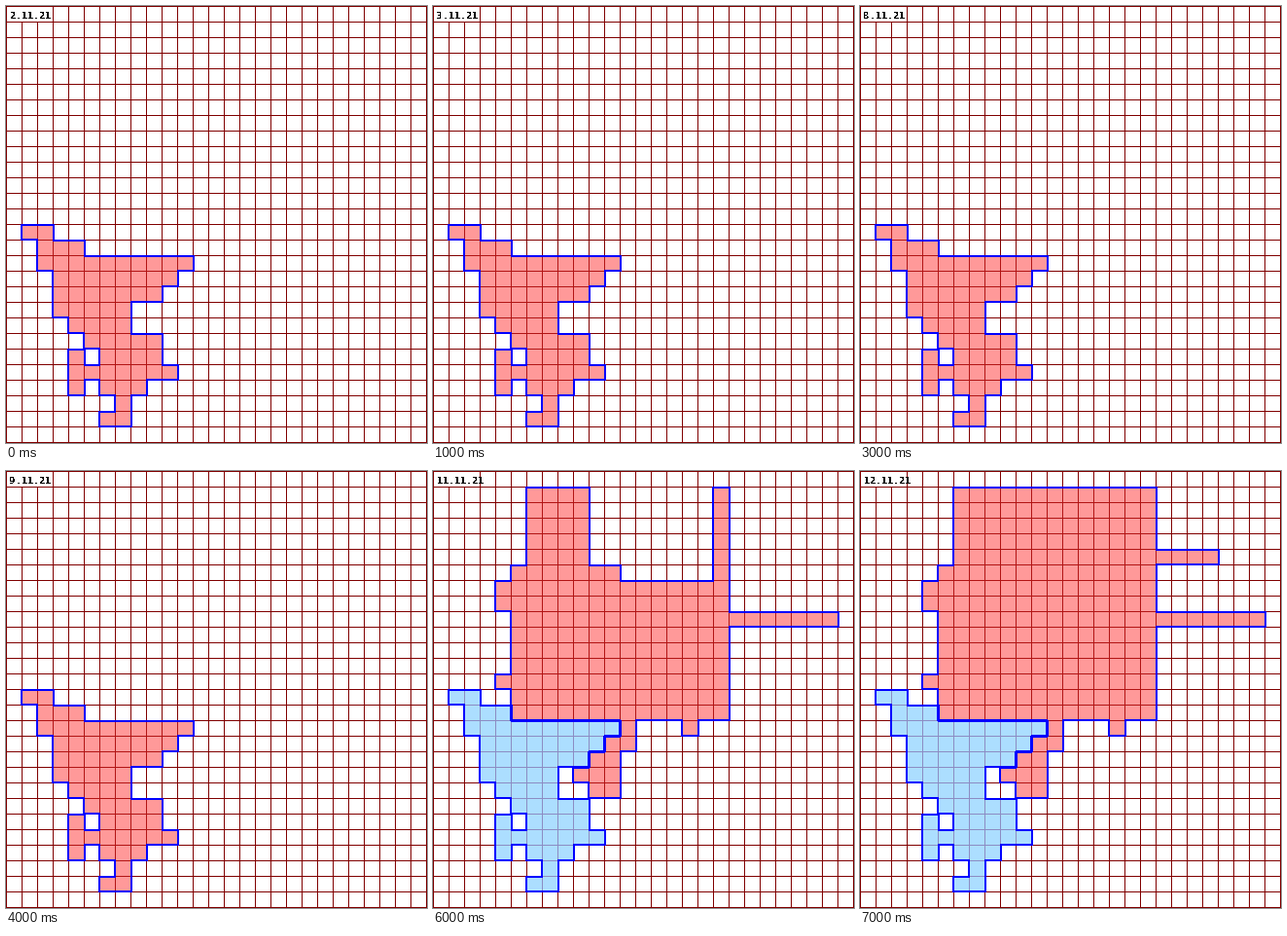
Animation of 433 by 449 pixels, one loop 8000 ms. Source, as a matplotlib script:

```python
import numpy as np
import matplotlib.pyplot as plt
from matplotlib.animation import FuncAnimation

W, H, CELL, DPI = 433, 449, 16, 64
COLS, ROWS = W // CELL, H // CELL
PITCH = 6                                  # width of one label character

WHITE = (255, 255, 255)
GRID = (128, 0, 0)
EDGE = (0, 0, 255)
PINK = (255, 153, 153), (178, 20, 20)      # fill, grid line inside the fill
SKY = (172, 222, 255), (140, 140, 195)

row, col = np.indices((ROWS, COLS))


def band(top, bottom, left, right):
    """Cells of rows top..bottom between two column limits."""
    return (row >= top) & (row <= bottom) & (col >= left) & (col < right)


def slope(*points):
    """Column limit per row, stepped along straight lines between points."""
    return np.rint(np.interp(row, *zip(*points)))


def south():
    left = slope((14, 1.4), (20, 3.8), (22, 6), (24, 6), (25, 7), (26, 6))
    right = slope((14, 3), (15, 5), (16, 12), (19, 8.4), (20, 8), (21, 10),
                  (23, 11), (24, 9), (26, 8))
    hook = band(22, 24, 4, 5) | band(23, 23, 4, 6)
    return band(14, 26, left, right) | hook


def north():
    body = band(7, 15, 5, 19)
    neck = band(1, 6, 6, 10) | band(6, 6, 5, 12)
    bumps = band(7, 8, 4, 5) | band(13, 13, 4, 5) | band(16, 16, 16, 17)
    arms = band(1, 6, 18, 19) | band(9, 9, 19, 26)
    spur = band(16, 20, 9 + abs(row - 19), 13 - (row > 17))
    return body | neck | bumps | arms | spur


def growth():
    return band(1, 6, 6, 19) | band(5, 5, 19, 23)


def fill(img, mask, colors):
    base, line = colors
    for r, c in np.argwhere(mask):
        x, y = c * CELL, r * CELL
        img[y:y + CELL + 1, x:x + CELL + 1] = line
        img[y + 1:y + CELL, x + 1:x + CELL] = base


def outline(img, mask):
    near = np.pad(mask, 1)
    for r, c in np.argwhere(mask):
        x, y = c * CELL, r * CELL
        x2, y2 = x + CELL, y + CELL
        if not near[r, c + 1]:
            img[y:y + 2, x:x2 + 1] = EDGE
        if not near[r + 2, c + 1]:
            img[y2 - 1:y2 + 1, x:x2 + 1] = EDGE
        if not near[r + 1, c]:
            img[y:y2 + 1, x - 1:x + 1] = EDGE
        if not near[r + 1, c + 2]:
            img[y:y2 + 1, x2:x2 + 2] = EDGE


def draw_map(*regions):
    img = np.full((H, W, 3), WHITE, np.uint8)
    img[::CELL] = GRID
    img[:, ::CELL] = GRID
    for mask, colors in regions:
        fill(img, mask, colors)
    for mask, _ in regions:
        outline(img, mask)
    img[1:CELL, 1:3 * CELL] = WHITE        # room for the date
    return img


early = draw_map((south(), PINK))
joined = draw_map((north(), PINK), (south(), SKY))
grown = draw_map((north() | growth(), PINK), (south(), SKY))

fig = plt.figure(figsize=(W / DPI, H / DPI), dpi=DPI)
ax = fig.add_axes([0, 0, 1, 1])
ax.axis("off")
picture = ax.imshow(early, extent=(0, W, H, 0), interpolation="nearest",
                    aspect="auto")
letters = [ax.text(4 + PITCH * (k + 0.5), 13, "", family="DejaVu Sans",
                   weight="bold", size=9 * 72 / DPI, color="black",
                   ha="center", va="baseline", antialiased=False)
           for k in range(8)]


def update(i):
    day = i + 2 if i < 2 else i + 5        # the 4th to the 6th are skipped
    picture.set_data(early if day < 10 else joined if day < 12 else grown)
    date = f"{day}.11.21"
    for letter, char in zip(letters, date.ljust(len(letters))):
        letter.set_text(char)
    return picture, *letters


anim = FuncAnimation(fig, update, frames=8, interval=1000,
                     repeat=True, repeat_delay=0)
plt.show()
```
